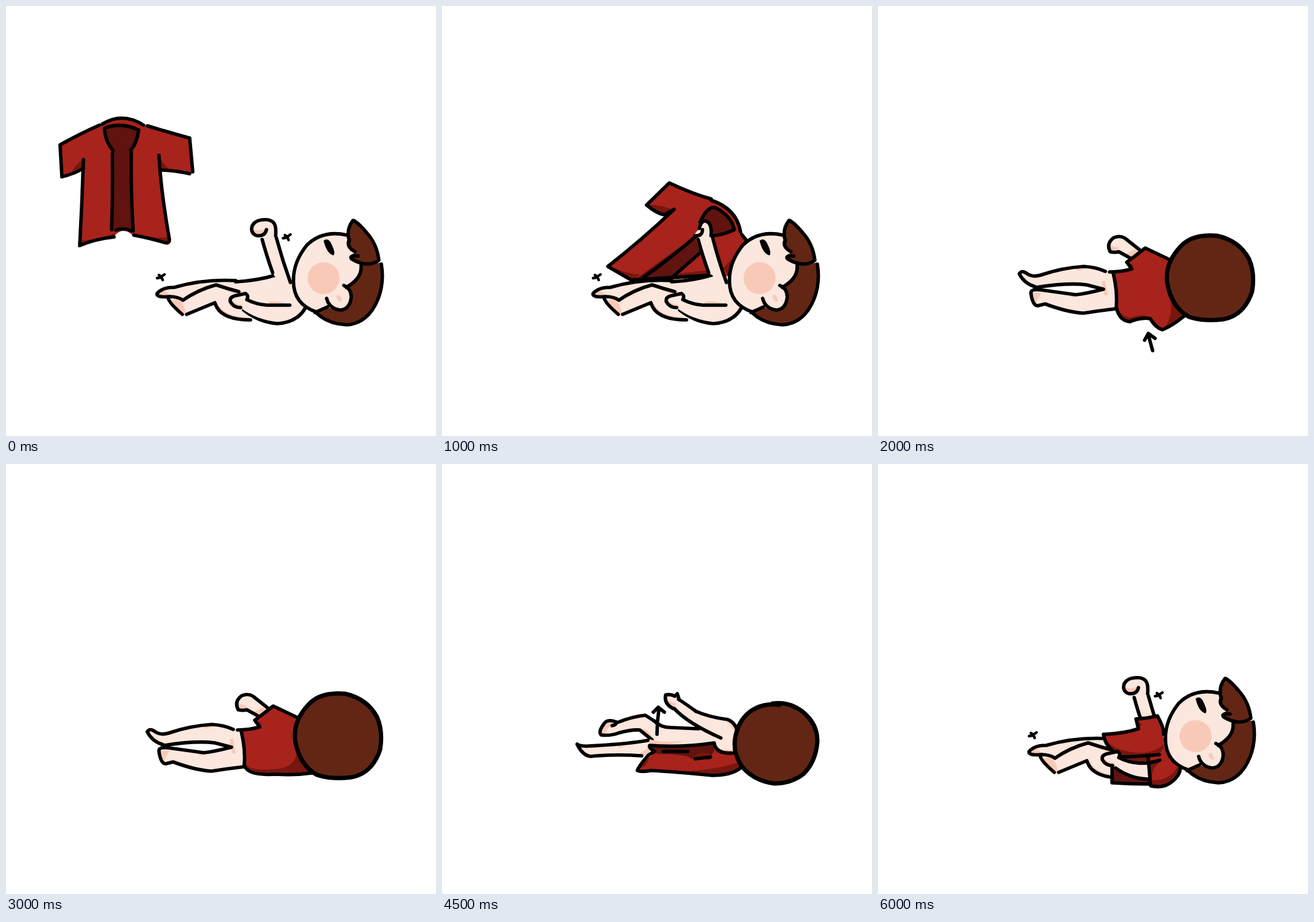
Animation of 700x700 px, one loop 8 s. Source, as an HTML page:

```html
<!DOCTYPE html>
<html lang="en">
<head>
<meta charset="utf-8">
<title>Changing a jacket lying down</title>
<style>
html, body { margin: 0; width: 100%; height: 100%; overflow: hidden; background: #fff; }
svg { display: block; width: 100%; height: 100%; }
path { stroke: none; }
.line { fill: none; stroke: #000; stroke-width: 5.6; stroke-linecap: round; stroke-linejoin: round; }
.skin { fill: #fbe7dd; }
.pink { fill: #f9c9b8; }
.red { fill: #a8231c; }
.shade { fill: #78170f; }
.dark { fill: #60130f; }
.hair { fill: #632614; }
.scene { display: none; }
.scene.on { display: inline; }
</style>
</head>
<body>
<svg viewBox="0 0 700 700" xmlns="http://www.w3.org/2000/svg">
<defs>
  <path id="spark" class="line" style="stroke-width:4.4" d="M-6 2L-1 1L6 -4M-3 -3L1 0L3 5"/>

  <g id="coat">
    <path class="red" d="M155 193Q190 172 226 194L300 215L304 272L252 266L266 386L206 373Q190 358 176 375L120 390L126 252L126 264L92 278L88 226Z"/>
    <path class="dark" d="M160 199Q188 189 216 202Q214 222 204 234L207 368Q190 356 172 368L173 238Q160 222 160 199Z"/>
    <path class="shade" d="M126 250Q112 258 107 272L126 264ZM250 245Q256 258 267 267L251 266ZM120 390L122 382Q150 380 177 370V376ZM207 368Q240 380 264 376L266 386Z"/>
    <path class="line" d="M152 194Q120 208 88 226L91 278Q112 273 126 264M126 250Q124 320 120 390Q146 379 176 376M157 192Q190 172 224 194M230 195Q266 206 299 215L304 270M299 273Q276 268 253 267M249 243Q252 300 266 380Q266 388 258 385Q230 377 208 373M216 202Q188 188 160 199Q162 222 174 235M216 202Q213 224 203 235M173 240Q174 300 172 364M204 237Q203 300 207 366M179 365Q190 360 204 366"/>
  </g>

  <g id="body">
    <path class="skin" d="M246 470Q252 458 274 458Q322 446 375 448Q410 447 439 437L466 440L487 492Q474 516 442 517Q414 515 390 498L398 511Q350 510 340 483L294 502L286 503Q264 483 264 475L267 473Z"/>
    <path class="pink" d="M252 463Q262 463 266 472L248 471ZM278 477Q292 484 292 500L284 500Q272 486 270 480ZM292 475Q318 455 345 456L330 460Q312 470 300 476ZM344 484Q356 506 394 507L396 511Q350 512 340 483ZM355 462Q372 466 385 464L376 470ZM430 481Q446 480 458 486L424 487ZM396 497Q420 510 438 512L436 516Q408 512 396 497Z"/>
    <path class="line" d="M267 473Q244 475 246 468Q254 458 274 458Q322 444 374 447M374 449Q410 447 439 438M266 473Q280 473 288 479Q312 462 342 454Q360 460 379 465M264 475Q265 483 287 502M294 502Q318 492 340 483Q348 511 398 511M387 495Q412 515 442 517Q474 515 487 492"/>
  </g>

  <g id="hand">
    <path class="skin" d="M382 491Q370 491 365 481Q364 474 372 472L390 468Q396 472 392 478Q408 486 425 487H440V513Q412 512 387 495Z"/>
    <path class="pink" d="M368 478Q373 487 385 486L382 491Q368 489 368 478Z"/>
    <path class="line" d="M382 491Q370 491 365 481Q364 474 372 472L390 468Q396 472 392 478Q408 486 425 487L462 487"/>
  </g>

  <g id="arm">
    <path class="skin" d="M417 378L437 440L464 452L439 374C440 358 440 346 418 348C394 350 396 374 411 374Z"/>
    <path class="pink" d="M402 364Q414 367 423 362Q422 372 411 373Q404 371 402 364ZM419 384Q428 400 436 434L431 425Z"/>
    <path class="line" d="M417 380Q424 406 434 434M440 377Q450 414 463 450M424 364Q422 374 411 374C396 374 394 350 418 348C440 346 440 360 439 374"/>
  </g>

  <g id="grip">
    <path class="skin" d="M417 378L436 436L464 452L438 374Q441 352 426 351Q420 360 418 364Q410 370 412 375Z"/>
    <path class="line" d="M417 380Q424 406 434 434M440 375Q450 414 463 450M412 374Q424 375 424 364M419 362Q421 350 429 350Q440 353 438 374"/>
  </g>

  <g id="face">
    <path class="skin" d="M555 372Q516 364 490 389Q468 416 468 446Q467 485 505 498L545 496L580 430L575 400Z"/>
    <circle class="pink" cx="517" cy="443" r="26"/>
    <path class="hair" d="M505 499L524 490Q545 502 560 485Q566 468 556 456Q580 440 578 420L610 418Q616 450 606 478Q590 518 554 520Q522 517 505 499Z"/>
    <path class="skin" d="M522 476Q526 494 545 495Q562 492 562 472Q558 456 550 455Z"/>
    <path class="pink" d="M539 470Q546 470 547 481Q540 482 538 474Z"/>
    <path class="hair" d="M566 348Q553 364 559 384Q554 392 568 402Q556 406 564 412Q585 427 607 415Q606 390 588 370Q576 354 566 348Z"/>
    <path d="M517 382Q525 376 530 388Q537 402 533 406Q522 403 517 382Z"/>
    <path class="line" d="M555 373Q516 364 490 389Q468 416 468 446Q467 485 505 498M503 499L523 490M505 499Q522 517 554 519Q590 517 606 476Q616 450 611 420M578 423Q580 443 554 458M550 455Q562 460 562 474Q560 493 545 495Q526 493 522 476M559 383Q553 364 565 349Q572 351 588 370Q604 388 607 414Q588 427 563 412Q557 406 573 407M559 380Q553 392 568 400"/>
  </g>

  <g id="held">
    <path class="red" d="M370 288L332 325L360 332L378 332L270 424L308 447L437 440L466 445L497 381L487 368Q488 340 438 315Z"/>
    <path class="dark" d="M422 352Q428 326 444 328Q472 342 476 364L441 374ZM411 375L312 447H372L420 400Z"/>
    <path class="shade" d="M334 324Q352 322 378 332L362 341ZM272 422Q296 436 322 437L312 447H308ZM380 436L434 430L437 440L372 446ZM458 426L480 404L468 442Z"/>
    <path class="line" d="M438 314Q408 306 370 288L333 324Q350 338 362 340L378 331Q326 380 270 424L308 446L438 438M438 316Q480 330 486 368M488 372L496 382Q482 404 468 436M420 352Q432 326 444 328Q470 340 476 364Q460 372 442 374M412 376Q370 412 328 442M420 402L372 444M308 447L330 446"/>
  </g>

  <g id="sleeve">
    <path class="red" d="M456 392L408 418L420 445L360 435V456L455 467L466 443Z"/>
    <path class="shade" d="M408 418L424 430L420 445L404 444ZM360 435L370 446Q420 458 464 452L455 467L360 456Z"/>
    <path class="line" d="M466 441Q464 414 456 392Q430 404 407 418L421 443Q400 445 360 435V455Q410 464 455 467L464 452"/>
  </g>

  <g id="backlegs">
    <path class="skin" d="M220 456Q230 460 335 450L342 448L322 433Q308 432 287 438Q272 443 260 441Q254 436 263 424Q272 414 285 421L330 409L364 430L345 470L325 475L242 477Q228 474 220 456Z"/>
    <path class="pink" d="M266 424Q274 417 280 422Q268 430 266 440H260Q256 434 266 424ZM228 462Q234 473 246 475L238 476Q230 470 228 462ZM282 457H300L290 462ZM318 432Q335 428 342 444ZM325 410L345 418L338 412ZM318 474Q330 466 340 458L338 474Z"/>
    <path class="line" d="M277 426Q285 424 284 420Q268 414 263 424Q254 436 259 441Q274 443 287 438Q308 432 322 433L342 449M285 421Q310 411 331 409L345 418M220 456Q224 460 240 459Q300 456 335 450M220 456Q228 474 242 476Q280 472 325 475"/>
  </g>

  <g id="palm">
    <path class="skin" d="M363 376Q372 374 380 378L383 374L386 383L405 397L424 420L376 398Q362 392 363 376Z"/>
    <path class="pink" d="M366 379Q372 390 382 390L376 397Q364 390 366 379Z"/>
    <path class="line" d="M386 383L383 374L379 378Q372 374 364 376Q361 390 376 398M385 383Q396 390 414 403"/>
  </g>

  <g id="worn">
    <use href="#backlegs"/>
    <use href="#palm" y="-11"/>
    <path class="red" d="M340 403Q346 450 318 498Q380 500 440 507Q475 507 488 490L500 440L480 412L437 382L410 397L378 393L390 410Q370 412 340 403Z"/>
    <path class="shade" d="M340 403L352 408Q354 460 334 498H318Q346 450 340 403ZM378 393L402 426L386 410ZM478 430Q470 470 480 486Q460 500 440 502V507Q475 507 488 490Z"/>
    <path class="line" style="stroke:#60130f" d="M405 444Q418 462 436 470"/>
    <path class="line" d="M340 403Q346 450 318 498Q324 502 340 499Q380 500 440 507Q475 507 488 490M340 403Q364 410 388 411M480 413Q460 394 437 382Q424 390 410 396L377 393Q390 408 402 426"/>
  </g>

  <g id="nape">
    <ellipse class="hair" cx="544" cy="455" rx="67" ry="65"/>
    <path class="line" style="stroke-width:7" d="M538 390Q565 386 588 404Q612 424 611 453Q608 486 588 505Q566 521 540 520Q508 516 488 492Q472 468 478 442Q484 414 506 400Q525 389 549 392"/>
  </g>

  <g id="rolled">
    <path class="skin" d="M230 434Q238 430 246 437Q256 441 265 438Q300 425 340 424L370 432H385L387 493L335 500Q310 500 272 485L260 488Q250 484 249 468Q250 460 264 462Q300 470 322 471L366 461Q310 448 258 458Q234 450 230 434Z"/>
    <path class="pink" d="M232 440Q240 452 258 455L250 457Q236 450 232 440ZM252 467H266L256 484ZM318 427H340L326 431ZM308 470H326L318 475ZM364 448L370 447L374 472L368 470Z"/>
    <path class="line" d="M370 432Q355 425 335 424Q300 426 265 438Q252 442 243 436Q234 429 230 436Q238 452 256 457M258 458Q310 450 340 454L367 461Q340 468 322 470Q300 467 264 462Q248 460 249 468Q252 488 260 488L272 485Q310 499 335 500Q360 496 386 493"/>
    <path class="skin" d="M377 397Q372 385 382 378Q395 374 402 378L426 396L410 411L388 402Z"/>
    <path class="pink" d="M378 388Q384 394 392 392L388 401L378 399ZM402 404L418 396L424 400L410 410Z"/>
    <path class="line" d="M426 397L402 378Q394 373 384 377Q371 386 378 400Q386 402 392 400L410 410"/>
  </g>
  <path id="shoulder" class="line" d="M377 433Q396 433 413 428L405 417Q420 406 435 394L475 413M383 435Q390 465 388 490"/>
  <g id="crown">
    <circle class="hair" cx="541" cy="442" r="70"/>
    <path class="line" style="stroke-width:7" d="M552 374Q512 370 492 392Q466 420 471 452Q478 490 506 506Q530 514 562 510Q596 504 609 465Q614 435 604 412Q588 382 552 374"/>
  </g>
  <g id="sparks"><use href="#spark" x="252" y="441"/><use href="#spark" x="457" y="376"/></g>
  <g id="figure"><use href="#body"/><use href="#hand"/><use href="#arm"/></g>
</defs>

<g class="scene">
  <use href="#sparks"/><use href="#coat"/><use href="#figure"/><use href="#face"/>
</g>
<g class="scene">
  <use href="#sparks"/>
  <use href="#coat" transform="translate(314.5 308) rotate(25) translate(-196 -286)"/>
  <use href="#figure"/><use href="#face"/>
</g>
<g class="scene">
  <use href="#sparks"/><use href="#held"/><use href="#body"/><use href="#hand"/><use href="#grip"/><use href="#face"/>
</g>
<g class="scene">
  <use href="#sparks"/><use href="#figure"/><use href="#sleeve"/><use href="#face"/>
</g>
<g class="scene">
  <use href="#rolled"/>
  <path class="red" d="M435 394L475 414L498 505L463 527L443 509Q425 508 410 514Q390 510 388 490L383 435L413 428L405 417Z"/>
  <path class="shade" d="M405 417L416 422L413 428ZM388 486Q394 506 412 507Q430 500 446 508L463 527Q484 506 474 468L498 505L463 527L443 510L410 514Q390 510 388 486Z"/>
  <use href="#shoulder"/>
  <path class="line" d="M388 490Q392 512 410 514Q428 506 443 509Q452 524 463 527Q480 520 498 505"/>
  <use href="#crown"/>
  <path class="line" d="M447 561L440 535M434 544L440 533L451 541"/>
</g>
<g class="scene">
  <use href="#rolled"/>
  <path class="red" d="M435 394L475 414L498 503Q470 507 440 505Q392 508 388 490L383 435L413 428L405 417Z"/>
  <path class="shade" d="M405 417L416 422L413 428ZM388 486Q396 500 430 497Q470 498 474 468L498 503Q470 507 440 505Q392 508 388 486Z"/>
  <use href="#shoulder"/>
  <path class="line" d="M388 490Q392 508 440 505Q470 507 498 503"/>
  <use href="#crown"/>
</g>
<g class="scene">
  <path class="dark" d="M368 510Q362 522 374 524Q410 516 440 525Q478 527 482 518Q480 510 470 508Z"/>
  <path class="line" d="M368 512Q364 523 375 524Q410 517 440 525Q478 527 482 518Q480 512 472 511"/>
  <use href="#figure"/><use href="#sleeve"/><use href="#face"/>
  <path class="line" d="M384 537L382 543M403 536L405 543M430 537L431 541M457 538L465 544"/>
</g>
<g class="scene">
  <path class="skin" d="M331 409L362 429L420 431L385 404L376 398L386 383Q420 410 465 416L484 435V475H340L325 474Z"/>
  <use href="#backlegs"/>
  <path class="pink" d="M338 448Q360 455 400 450Q360 460 338 456ZM462 419Q476 424 480 440Q472 428 462 419ZM440 460Q460 468 478 464V470H460Z"/>
  <use href="#palm"/>
  <path class="line" d="M345 418Q356 429 372 429L418 431M412 402Q434 412 465 416Q476 420 480 432M378 398Q400 422 454 446"/>
  <path class="red" d="M337 458Q380 462 443 454Q446 470 460 471H478L486 495Q470 508 440 507Q380 500 318 500Q322 492 346 470Z"/>
  <path class="dark" d="M340 460L442 455Q446 468 438 474L406 480Q400 472 350 472Z"/>
  <path class="shade" d="M318 498L340 474L332 490ZM370 501Q440 500 482 486L486 495Q470 508 440 507ZM408 478Q420 464 440 474L436 482Z"/>
  <path class="line" d="M478 470Q446 474 443 454Q390 462 338 458Q336 462 346 468L336 474Q320 492 318 499Q324 502 340 499Q380 501 440 507Q470 507 486 495M360 468H400M412 480L437 477"/>
  <use href="#nape"/>
  <path class="line" d="M350 440Q350 420 353 400M344 404L352 396L362 404"/>
</g>
<g class="scene"><use href="#worn"/><use href="#nape"/></g>
<g class="scene"><use href="#worn"/><use href="#nape" y="-10"/></g>
<g class="scene">
  <use href="#sparks"/><use href="#body"/><use href="#arm"/>
  <path class="dark" d="M380 490V519L444 522V500Z"/>
  <path class="red" d="M367 440Q400 439 424 431L420 415L455 410Q466 430 466 468L445 488H425L394 476Q372 466 367 440Z"/>
  <path class="shade" d="M420 415L430 424L424 431ZM368 446Q384 468 424 470Q452 470 465 456L466 470L445 488H425L394 476Q372 466 368 446Z"/>
  <path class="line" d="M381 492V519Q410 521 441 521M367 440Q400 439 424 431L420 415Q440 414 455 410Q466 430 465 440M367 440Q370 462 394 475"/>
  <use href="#hand"/>
  <path class="line" d="M387 495Q410 512 440 513"/>
  <path class="red" d="M438 476L458 473L466 460Q482 468 493 495Q486 528 446 526Q440 505 438 476Z"/>
  <path class="shade" d="M439 482L458 486Q446 494 446 512ZM446 515Q476 516 489 490L493 495Q486 528 446 526Z"/>
  <path class="line" d="M394 477Q430 476 458 473M440 478Q442 506 444 524Q466 529 480 516Q492 506 492 495M441 487L459 482"/>
  <use href="#face"/>
</g>
</svg>
<script>
const starts = [0, 500, 1000, 1500, 2000, 3000, 3500, 4500, 5000, 5500, 6000];
const loop = 8000;
const scenes = document.querySelectorAll('.scene');
const origin = performance.now();
let shown = -1;

function draw() {
  const t = (performance.now() - origin) % loop;
  const now = starts.findLastIndex(s => s <= t);
  if (now !== shown) {
    scenes.forEach((scene, i) => scene.classList.toggle('on', i === now));
    shown = now;
  }
  requestAnimationFrame(draw);
}
draw();
</script>
</body>
</html>
```
